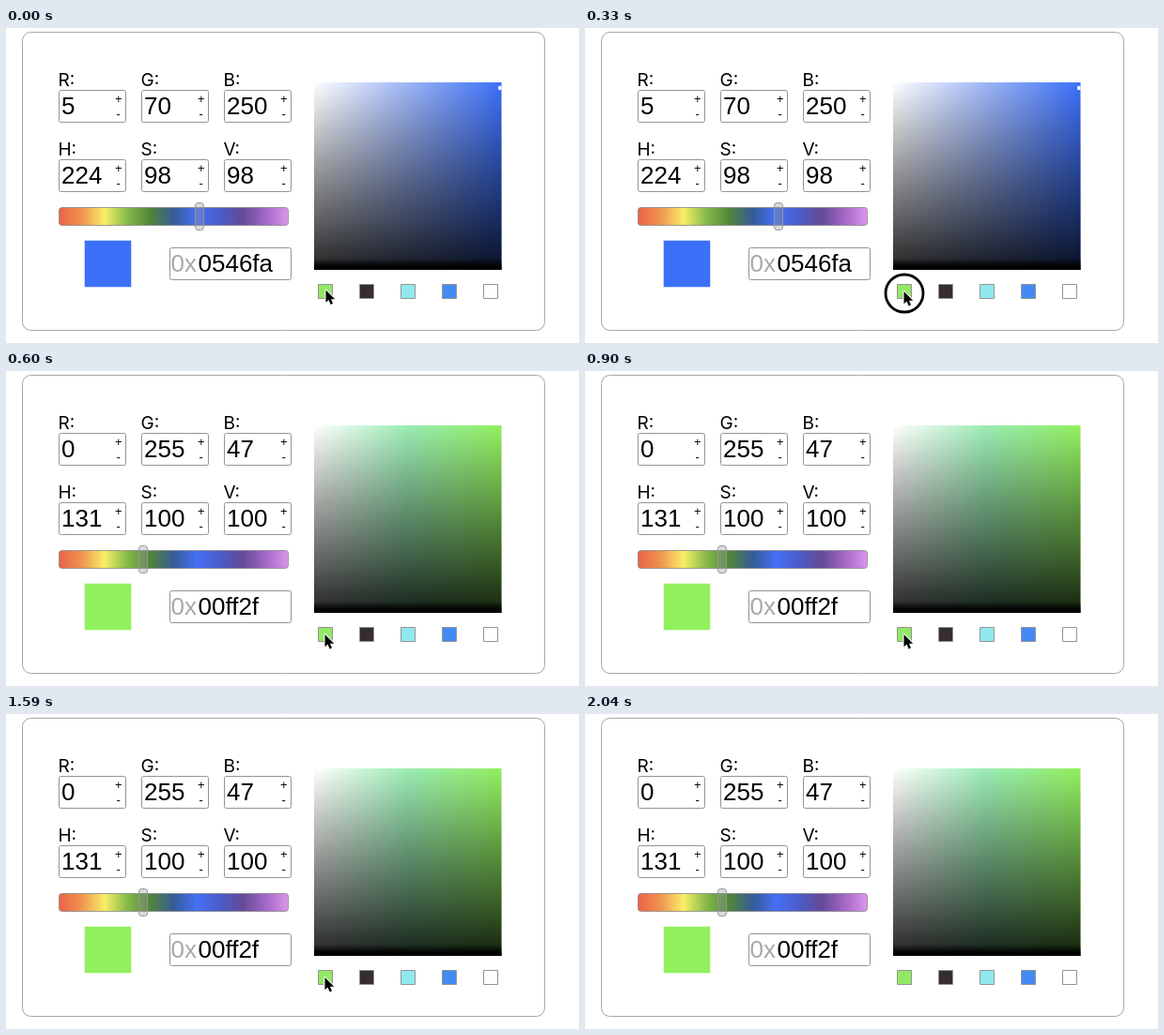
Write an HTML page with a canvas that moves like this. It is 610 px wide and 336 px high and loops after 2.1 s.

```html
<!DOCTYPE html>
<html lang="en">
<head>
<meta charset="utf-8">
<title>Colour picker</title>
<style>
html, body { margin: 0; width: 100%; height: 100%; overflow: hidden; background: #fff; }
canvas { display: block; width: 610px; height: 336px; }
</style>
</head>
<body>
<canvas id="stage" width="610" height="336"></canvas>
<script>
const ctx = document.getElementById('stage').getContext('2d');
const LOOP = 2100;
const STEP = 30;
const SANS = '"Liberation Sans", Arial, sans-serif';
const LABEL = 'Inter, Roboto, sans-serif';
const LINE = '#949494';

// shades run from white to the pure hue
const BLUE = makeState([5, 70, 250], ['#fff', '#9db5f6', '#3c70f8']);
const GREEN = makeState([0, 255, 47], ['#fff', '#9becb4', '#92f05e']);
const CHIPS = ['#92e865', '#352d32', '#90e8ee', '#438af5', '#ffffff'];
const HUES = ['#ea6248', '#ef9450', '#f8ee66', '#84b94a', '#4f8539', '#355c98',
  '#466ff5', '#4b5cc8', '#644a98', '#a468c6', '#de96ec'];

const clamp = v => Math.max(0, Math.min(1, v));
const smooth = (t, a, b) => {
  const u = clamp((t - a) / (b - a));
  return u * u * (3 - 2 * u);
};

function toHsv(rgb) {
  const max = Math.max(...rgb), span = max - Math.min(...rgb);
  const i = rgb.indexOf(max);
  const turn = i * 2 + (rgb[(i + 1) % 3] - rgb[(i + 2) % 3]) / span;
  return [(turn * 60 + 360) % 360, span / max * 100, max / 2.55].map(Math.round);
}

function makeState(rgb, shades) {
  const hsv = toHsv(rgb);
  const hex = rgb.map(v => v.toString(16).padStart(2, '0')).join('');
  return { values: [...rgb, ...hsv], hsv, hex, shades };
}

function box(x, y, w, h, r, fill, stroke) {
  ctx.beginPath();
  ctx.roundRect(x + 0.5, y + 0.5, w - 1, h - 1, r);
  ctx.fillStyle = fill;
  ctx.fill();
  ctx.strokeStyle = stroke;
  ctx.lineWidth = 1;
  ctx.stroke();
}

function text(str, x, y, size, family = SANS, color = '#000') {
  ctx.font = size + 'px ' + family;
  ctx.fillStyle = color;
  ctx.fillText(str, x, y);
}

// evenly spaced colours along a line
function gradient(x0, y0, x1, y1, colors) {
  const g = ctx.createLinearGradient(x0, y0, x1, y1);
  colors.forEach((color, i) => g.addColorStop(i / (colors.length - 1), color));
  return g;
}

function dot(x, y, r) {
  ctx.beginPath();
  ctx.arc(x, y, r, 0, 2 * Math.PI);
}

function drawFields(state) {
  [...'RGBHSV'].forEach((name, i) => {
    const x = 56 + (i % 3) * 88, y = i < 3 ? 66 : 140;
    text(name + ':', x - 0.5, y - 4, 19, LABEL);
    box(x, y, 72, 35, 2, '#fff', LINE);
    text(state.values[i], x + 3, y + 26, 26);
    text('+', x + 60, y + 13.5, 13);
    text('-', x + 61.5, y + 29.5, 13);
  });
  box(174, 234, 130, 35, 2, '#fff', LINE);
  text('0x', 175.5, 260, 26, SANS, '#a9a9a9');
  text(state.hex, 204.5, 260, 26);
}

function drawSlider(hue) {
  box(56, 191, 245, 20, 3, gradient(56, 0, 301, 0, HUES), 'rgba(130,130,130,.75)');
  const x = Math.round(61.5 + hue / 360 * 232);
  box(x - 5, 186, 10, 30, 3, 'rgba(150,150,150,.35)', LINE);
}

function drawSquare({ hsv: [, s, v], shades }) {
  const dark = [0, 0.21, 0.42, 0.62, 0.84].map(a => `rgba(0,0,0,${a})`);
  ctx.save();
  ctx.beginPath();
  ctx.rect(328, 58, 199.5, 200);
  ctx.clip();
  for (const fill of [gradient(328, 0, 528, 0, shades), gradient(0, 58, 0, 254, dark)]) {
    ctx.fillStyle = fill;
    ctx.fillRect(328, 58, 200, 200);
  }
  ctx.fillStyle = gradient(0, 246, 0, 255, ['rgba(0,0,0,0)', '#000']);
  ctx.fillRect(328, 246, 200, 12);
  dot(330 + 2 * s, 260 - 2 * v, 2.2);
  ctx.fillStyle = '#fff';
  ctx.fill();
  ctx.restore();
}

function drawCursor(x, y) {
  ctx.save();
  ctx.translate(x, y);
  ctx.scale(0.95, 0.95);
  const arrow = new Path2D('M0 0V14L3.2 11.1 5.4 16.2 7.9 15.1 5.7 10.2H10.2Z');
  ctx.lineJoin = 'round';
  ctx.strokeStyle = '#fff';
  ctx.lineWidth = 2.2;
  ctx.stroke(arrow);
  ctx.fillStyle = '#000';
  ctx.fill(arrow);
  ctx.restore();
}

function drawRing(alpha) {
  ctx.globalAlpha = alpha;
  ctx.strokeStyle = '#000';
  ctx.lineWidth = 2.8;
  dot(340, 283, 20);
  ctx.stroke();
  ctx.globalAlpha = 1;
}

function draw(t) {
  const state = t < 600 ? BLUE : GREEN;
  ctx.fillStyle = '#fff';
  ctx.fillRect(0, 0, 610, 336);
  box(17, 4, 557, 319, 9, '#fff', '#a6a6a6');

  drawFields(state);
  drawSlider(state.hsv[0]);
  box(83, 226, 51, 51, 0, state.shades[2], 'rgba(255,255,255,.45)');
  drawSquare(state);
  CHIPS.forEach((color, i) => box(332 + i * 44, 273, 16, 16, 0, color, LINE));

  drawRing(smooth(t, 120, 240) - smooth(t, 420, 540));

  // settles on the chip, then leaves through the bottom edge
  const settle = smooth(t, 0, 120);
  const leave = clamp((t - 1740) / 300) ** 2;
  drawCursor(340.5 - settle, 279.5 + 1.5 * settle + 58 * leave);
}

const start = performance.now();
function tick() {
  const t = (performance.now() - start) % LOOP;
  draw(Math.floor(t / STEP) * STEP);
  requestAnimationFrame(tick);
}
tick();
</script>
</body>
</html>
```
